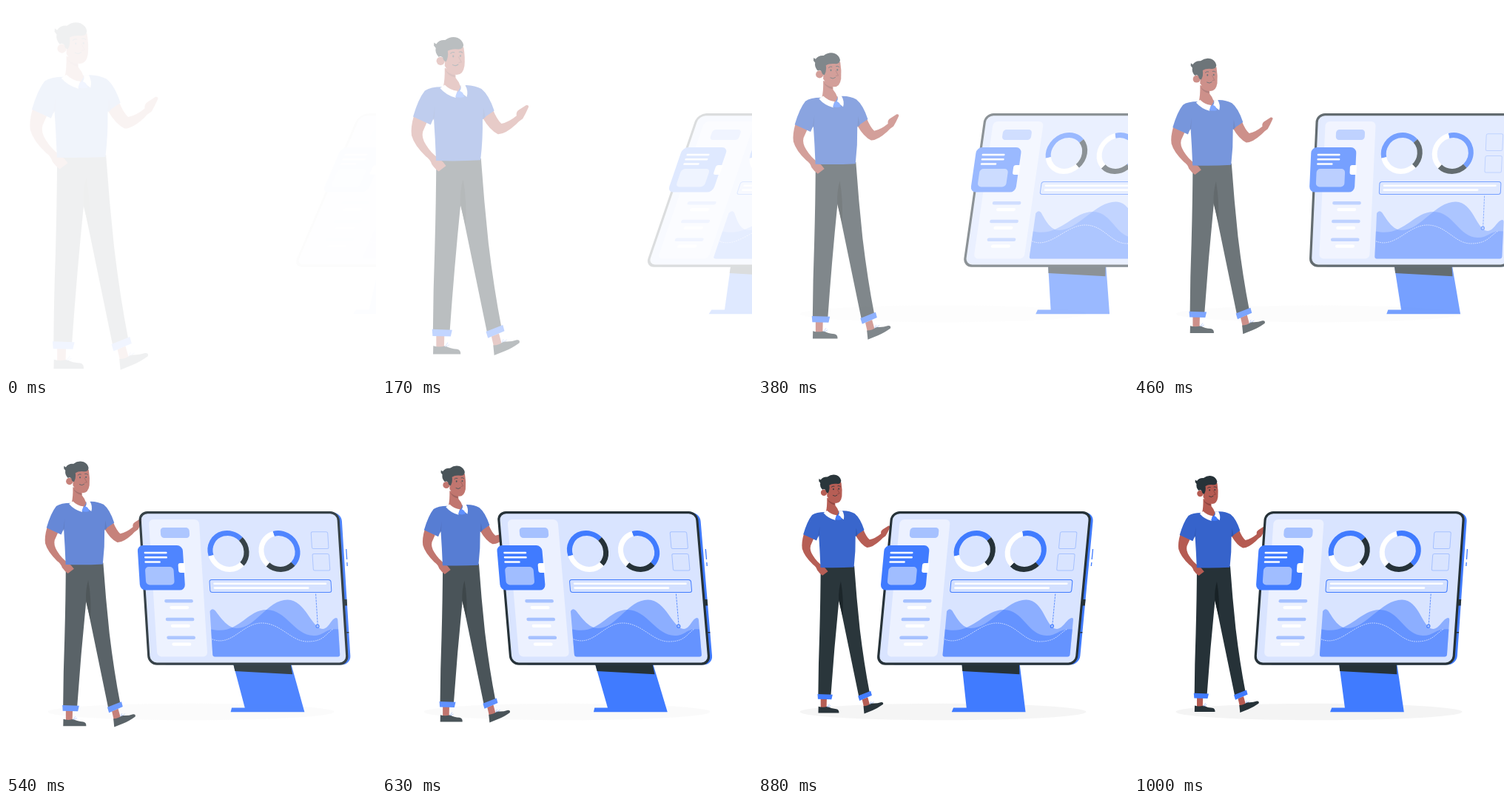
An HTML page that plays this animation: 500 by 500 pixels, repeating every 1.04 s.

```html
<!DOCTYPE html>
<html lang="en">
<head>
<meta charset="utf-8">
<title>Dashboard presenter</title>
<style>
  html, body { margin: 0; width: 100%; height: 100%; overflow: hidden; background: #fff; }
  svg { display: block; width: 100%; height: 100%; }
  .ink { fill: #263238; }
  .blue { fill: #407bff; }
  .soft { fill: #a6c1ff; }
  .white { fill: #fff; }
  .skin { fill: #b55b52; }
  .shirt { fill: #3663cb; }
  .line { fill: none; stroke-linecap: round; stroke-linejoin: round; }
  .ring circle { fill: none; stroke-width: 7; }
</style>
</head>
<body>
<svg viewBox="0 0 500 500">
  <ellipse id="floor" cx="250" cy="416" rx="193.5" ry="11.3" fill="#f4f4f4"/>

  <g id="man">
    <!-- feet -->
    <path class="skin" d="M85 396H93.200L92.800 410H85ZM140.500 398L148 395L151 406L143 409Z"/>
    <path class="ink" d="M82 407.500Q88 409.500 94 407.500Q99 410.500 106 410.800Q109.800 411.500 109.500 416H81.800Z"/>
    <path class="ink" d="M142.300 407Q148.500 407 152.500 403Q159 404 166 401.600Q169.500 401.300 168.600 404.500Q161 410 154.500 412.500L143.300 417Z"/>
    <path class="line" stroke="#a6c1ff" stroke-width=".8" d="M94 408L96.500 404.500M95 408L98 406.500M151 404L152.500 401M152.500 403.500L156 401.500"/>
    <!-- legs -->
    <path class="ink" d="M85 219L130 219Q133 262 137.500 304Q143 350 150.600 389L136.300 395L109.500 265Q103 330 98.600 393L81.700 392Q82 350 83.500 310Q84.800 262 85 219Z"/>
    <path fill="#182226" d="M112 240Q108.500 252 109.300 266L114.500 287Q116 262 112 240Z"/>
    <path class="blue" d="M80.800 390.800L101 391.500L99.500 398L81.300 397.600ZM135 393.300L152 386.600L153.600 392.600L137 399.800Z"/>
    <!-- arms -->
    <path class="skin" d="M62.500 176Q59 188 60.200 196Q63 206 74.500 217Q79 220 80.500 225Q84 230 87.500 232L94.800 226.500Q92 222 87.500 219Q80 214 74.500 205Q70 198 71.500 192L75.500 183Z"/>
    <path class="skin" d="M131.500 178Q139 191 147 194.600Q154 195 165 185Q168 181.500 172 179Q175 174 177.800 167.500Q178.300 165 175.500 165.500L168.500 170Q165 172 165.800 176Q158 182.500 150.500 184Q146 180 142 170Z"/>
    <!-- shirt -->
    <path class="shirt" d="M91 147Q79 147 73.500 151Q67 159 61.700 177L79.400 185.200L82.500 178Q84 200 84.800 221.300Q108 222 129.500 220.800Q132 200 131.600 179L143.300 171Q138 155 130.500 149Q124 145.500 115.500 145.300Z"/>
    <path fill="#2e55b0" d="M83.800 166L81.500 181L82.900 178.500ZM131.600 180L132.600 168L134.400 177.600Z"/>
    <!-- neck, head -->
    <path class="skin" d="M93.500 128L104.500 131V138Q108 142 109.500 147L106 153L92 147Q93.800 140 93.500 128Z"/>
    <path class="white" d="M93.500 145Q99 150.500 106.200 151.200L104.500 158Q95 155.500 88.800 148.300ZM109.500 145.500L114 145.200Q117.500 151 115.700 157.200L108.500 151.500Q110.500 149 109.500 145.500Z"/>
    <path class="blue" d="M104.200 157L105.800 152.500Q108.500 149.800 111.500 153L113.200 157Q109 158.500 104.200 157Z"/>
    <path class="skin" d="M94 107L112.500 107Q114.200 117 113.400 126Q112 135 105.500 135Q98 134 93.500 126Z"/>
    <path fill="#8e443f" d="M94 130Q98 134.500 103.500 135.200L104 137.500Q97 136.500 94 130Z"/>
    <circle class="skin" cx="89.400" cy="121" r="4.200"/>
    <path class="ink" d="M87.500 117Q83.500 113 84.500 108L82.600 105.500L82.800 102.500L85 104Q88 99.500 94 100Q100 95.500 106.500 97.700Q111.500 100 112.400 105Q112 109.500 107 109.200Q100 108.500 96.500 111Q97.500 117 95 121.500Q92.500 122 91.500 117.500Q89.500 115.500 87.500 117Z"/>
    <g class="ink">
      <ellipse cx="102.100" cy="116.400" rx=".8" ry="1.100"/>
      <ellipse cx="109.300" cy="116" rx=".8" ry="1.100"/>
    </g>
    <path class="line" stroke="#263238" stroke-width=".8" d="M99.500 113.500Q101 111.700 103.200 112.500M108 112Q110 111.300 111.300 112.700M101.500 124.800Q104.500 126.800 107 124.500"/>
    <path class="line" stroke="#8e443f" stroke-width=".9" d="M107.500 117L110.300 122.200L107.800 122.700"/>
  </g>

  <g id="screen">
    <!-- stand -->
    <path class="blue" d="M282 350H360L374.300 416.200H274.500L276.300 410.500H294L284 361Z"/>
    <path class="ink" d="M281.800 350H359.500L361.300 365.300L283.800 361Z"/>
    <!-- body -->
    <rect class="blue" x="180" y="146.500" width="261" height="205.800" rx="12"/>
    <rect class="ink" x="437" y="264" width="4" height="8.500"/>
    <rect class="ink" x="438" y="308" width="3" height="1.500"/>
    <path class="line" stroke="#407bff" stroke-width="1.300" style="stroke-linecap:butt" d="M444.500 196V210M444.500 214V219"/>
    <rect class="ink" x="166.800" y="145" width="271.200" height="207.800" rx="12"/>
    <rect fill="#d9e4ff" x="170" y="148.200" width="264.800" height="201.200" rx="9"/>
    <!-- side panel -->
    <rect fill="#ecf1ff" x="180" y="156" width="68" height="185.500" rx="6"/>
    <rect class="soft" x="195" y="167" width="39" height="14" rx="4.500"/>
    <g id="rows"></g>
    <!-- charts -->
    <g class="ring" id="rings"></g>
    <g fill="none" stroke="#a6c1ff">
      <rect x="398.300" y="172.800" width="22.500" height="22.600" rx="2"/>
      <rect x="398.300" y="202.500" width="22.500" height="22.600" rx="2"/>
    </g>
    <rect x="257" y="237.600" width="164" height="16.800" rx="3" fill="#d3e0ff" stroke="#407bff"/>
    <rect class="white" x="262" y="241.400" width="153" height="2.600" rx="1.300"/>
    <rect class="white" x="262" y="247.300" width="129" height="2.600" rx="1.300"/>
    <g class="blue" fill-opacity=".5">
      <path d="M255 280Q258 275 262 279C270 290 278 303 290 303C316 303 333 264.500 361 264.500C385 264.500 391 304 406 304C414 304 419 289 425 289Q427 289 427 292V338.500Q427 341.500 424 341.500H258Q255 341.500 255 338.500Z"/>
      <path d="M255 304.500C292 313 304 278 332 278C358 278 368 313 393 313C408 313 410 302 427 304.500V338.500Q427 341.500 424 341.500H258Q255 341.500 255 338.500Z"/>
    </g>
    <path class="line" stroke="#fff" stroke-opacity=".75" stroke-width=".9" stroke-dasharray=".8 2" d="M256 318C282 328 298 296 324 296S362 321 384 321S408 312 420 304"/>
    <path class="line" stroke="#407bff" stroke-width=".8" stroke-dasharray="2 2" d="M399.500 257V297.500"/>
    <circle cx="399.200" cy="300.200" r="2.100" fill="#a6c1ff" stroke="#407bff"/>
    <!-- card -->
    <rect class="blue" x="162.500" y="191" width="61" height="60.600" rx="7.500"/>
    <path class="white" d="M219 215H225V228H219Q216 228 216 225V218Q216 215 219 215Z"/>
    <g class="white">
      <rect x="171" y="199.800" width="31" height="2.500" rx="1.200"/>
      <rect x="171" y="206" width="31" height="2.500" rx="1.200"/>
      <rect x="171" y="212.200" width="21.500" height="2.500" rx="1.200"/>
    </g>
    <rect fill="#a0bdff" x="171" y="220" width="38.500" height="24.500" rx="5"/>
  </g>
</svg>
<script>
const $ = id => document.getElementById(id);
const floor = $('floor'), man = $('man'), screen3 = $('screen');

$('rows').innerHTML = [264, 288.8, 313.6].map(y =>
  `<rect class="soft" x="194.500" y="${y}" width="38.700" height="4.400" rx="2.200"/>` +
  `<rect class="white" x="201" y="${y + 9}" width="26" height="4.200" rx="2.100"/>`).join('');

const arc = (cx, from, to, color) =>
  `<circle cx="${cx}" cy="199" r="24.500" pathLength="360" stroke="${color}"
    stroke-dasharray="${to - from} ${360 - to + from}" transform="rotate(${from} ${cx} 199)"/>`;
$('rings').innerHTML =
  arc(285, 166, 317, '#407bff') + arc(285, 317, 405, '#263238') + arc(285, 45, 166, '#fff') +
  arc(354, 255, 405, '#407bff') + arc(354, 45, 133, '#263238') + arc(354, 133, 255, '#fff');

// Cubic timing curve with control points (x1, 0|0) and (x2, 1)
function bezier(x1, x2) {
  return x => {
    if (x <= 0) return 0;
    if (x >= 1) return 1;
    let lo = 0, hi = 1;
    for (let i = 0; i < 30; i++) {
      const u = (lo + hi) / 2, v = 1 - u;
      if (3 * u * v * v * x1 + 3 * u * u * v * x2 + u * u * u < x) lo = u; else hi = u;
    }
    return lo * lo * (3 - 2 * lo);
  };
}
const easeIn = bezier(0.42, 1), easeOut = bezier(0, 0.58);
const mix = (a, b, k) => a + (b - a) * k;

const LOOP = 1040, STEP = 1000 / 24;
const LEAN = -0.07, PIVOT = 281, SLIDE = 254;

function skewAt(p) {
  if (p < 0.6) return mix(-20, 10, easeIn(p / 0.6));
  if (p < 0.8) return mix(10, -2, easeIn((p - 0.6) / 0.2));
  return mix(-2, 0, easeIn((p - 0.8) / 0.2));
}

function draw(now) {
  const tick = Math.min(24, Math.floor((now % LOOP + 2) / STEP));
  const p = Math.min(1, 0.04 + 0.0408 * tick);

  floor.setAttribute('opacity', easeIn(p));

  const out = easeOut(p), s = 1.5 - 0.5 * out;
  man.setAttribute('opacity', out);
  man.setAttribute('transform', `translate(119 257) scale(${s}) translate(-119 -257)`);

  const enter = easeIn(p / 0.6);
  const k = Math.tan(skewAt(p) * Math.PI / 180) + LEAN;
  screen3.setAttribute('opacity', enter);
  screen3.setAttribute('transform', `matrix(1 0 ${k} 1 ${SLIDE * (1 - enter) - k * PIVOT} 0)`);
}

let start;
function loop(now) {
  start ??= now;
  draw(now - start);
  requestAnimationFrame(loop);
}
draw(0);
requestAnimationFrame(loop);
</script>
</body>
</html>
```
